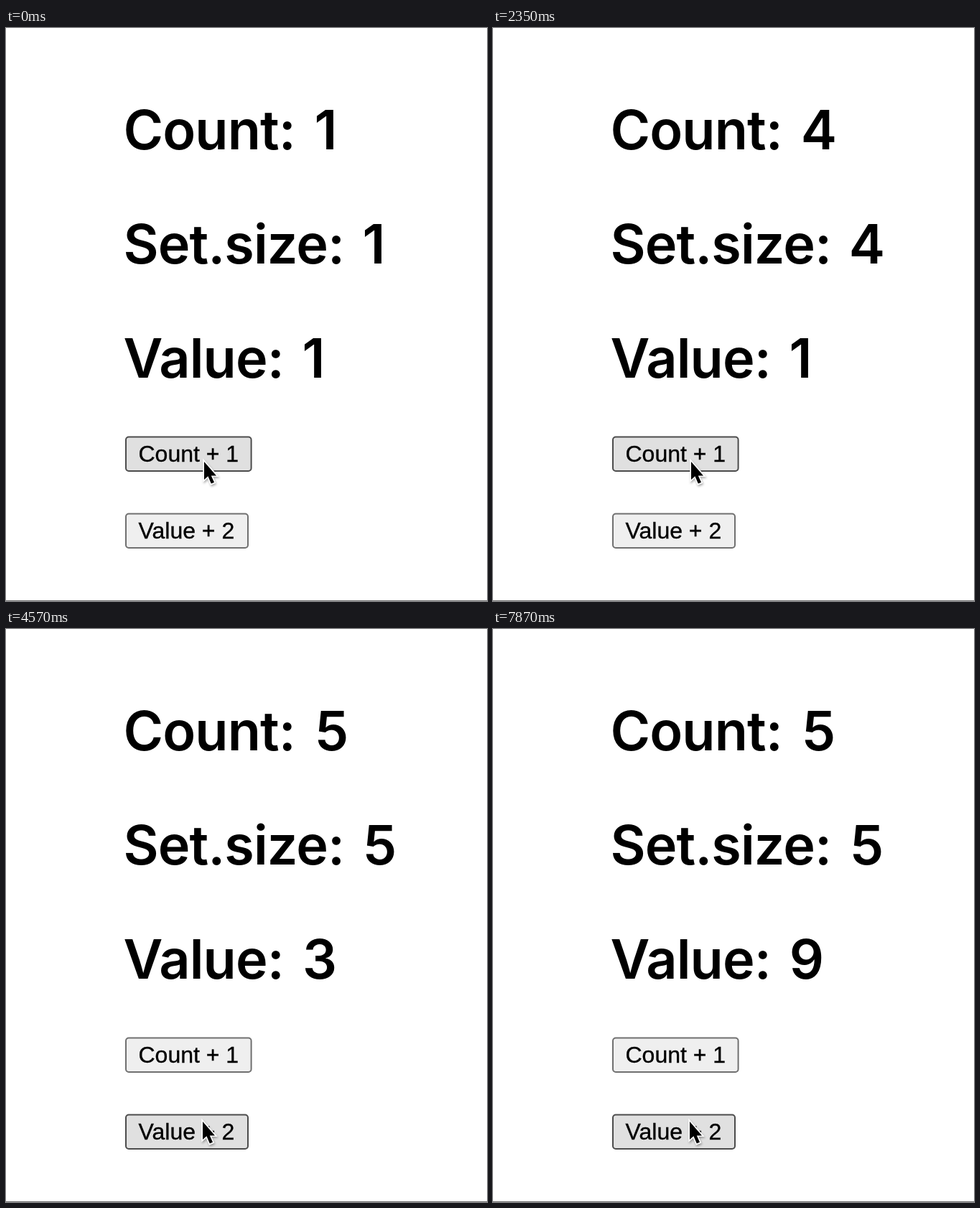
Recreate the animation shown at these times as an HTML page. Size 670x798 px, loop 7.99 s.

```html
<!DOCTYPE html>
<html lang="en">
<head>
<meta charset="utf-8">
<title>Counter demo</title>
<style>
  html, body { margin: 0; width: 100%; height: 100%; overflow: hidden; background: #fff; }
  svg { display: block; width: 670px; height: 798px; }
  .title { font: 600 75.5px Inter, sans-serif; font-optical-sizing: none; letter-spacing: -0.9px; }
  .digit { letter-spacing: 0; text-anchor: middle; }
  .button rect { fill: #efefef; stroke: #707070; stroke-width: 2; }
  .button.hover rect { fill: #e0e0e0; stroke: #4c4c4c; }
  .button.active rect { fill: #f4f4f4; stroke: #868686; }
  .button text { font: 32px "Liberation Sans", Arial, sans-serif; stroke: #000; stroke-width: .35; }
  #cursor { filter: drop-shadow(1px 2px 1.5px rgba(0, 0, 0, .32)); }
</style>
</head>
<body>
<svg viewBox="0 0 670 798">
  <text class="title" x="163.5" y="169.2">Count:</text>
  <text class="title" x="163.5" y="327.5">Set.size:</text>
  <text class="title" x="163.5" y="487">Value:</text>
  <text class="title digit" id="count" y="169.2"></text>
  <text class="title digit" id="size" y="327.5"></text>
  <text class="title digit" id="value" y="487"></text>

  <g class="button" id="addCount">
    <rect x="167" y="569.5" width="174.6" height="47.5" rx="4"/>
    <text x="184.5" y="604">Count + 1</text>
  </g>
  <g class="button" id="addValue">
    <rect x="167" y="676.5" width="170" height="47.5" rx="4"/>
    <text x="184.5" y="711">Value + 2</text>
  </g>

  <rect y="797" width="670" height="1" fill="#707070"/>

  <path id="cursor" d="M0 0V25L5.4 20.2L9.8 30.6L14 28.8L9.8 19.4H17Z"
        stroke="#fff" stroke-width="3.4" paint-order="stroke"/>
</svg>
<script>
  const LOOP = 7990;
  const MOVE = { start: 3230, length: 400, from: [276, 604], to: [274, 686] };

  // Each press: time down, time the number changes, time up
  const countPresses = [[290, 370, 400], [510, 590, 630], [2130, 2230, 2270], [2870, 2970, 3010]];
  const valuePresses = [[4350, 4450, 4490], [5270, 5350, 5410], [6790, 6890, 6930], [7410, 7510, 7550]];

  const el = id => document.getElementById(id);
  const smooth = p => p * p * (3 - 2 * p);
  const clicks = (presses, t) => presses.filter(p => t >= p[1]).length;
  const isDown = (presses, t) => presses.some(p => t >= p[0] && t < p[2]);

  // The narrow 1 sits left of the center of the wider digits
  function setDigit(id, n, center) {
    const node = el(id);
    node.textContent = n;
    node.setAttribute("x", n === 1 ? center - 8.5 : center);
  }

  function setButton(id, hover, down) {
    el(id).setAttribute("class", "button" + (down ? " active" : hover ? " hover" : ""));
  }

  function draw(t) {
    const p = smooth(Math.min(1, Math.max(0, (t - MOVE.start) / MOVE.length)));
    const [x, y] = MOVE.from.map((a, i) => a + (MOVE.to[i] - a) * p);
    el("cursor").setAttribute("transform", `translate(${x} ${y})`);

    const count = 1 + clicks(countPresses, t);
    setDigit("count", count, 454);
    setDigit("size", count, 521);
    setDigit("value", 1 + 2 * clicks(valuePresses, t), 437);

    setButton("addCount", y < 629, isDown(countPresses, t));
    setButton("addValue", y > 676, isDown(valuePresses, t));
  }

  const begin = performance.now();
  function tick() {
    draw((performance.now() - begin) % LOOP);
    requestAnimationFrame(tick);
  }
  tick();
</script>
</body>
</html>
```
